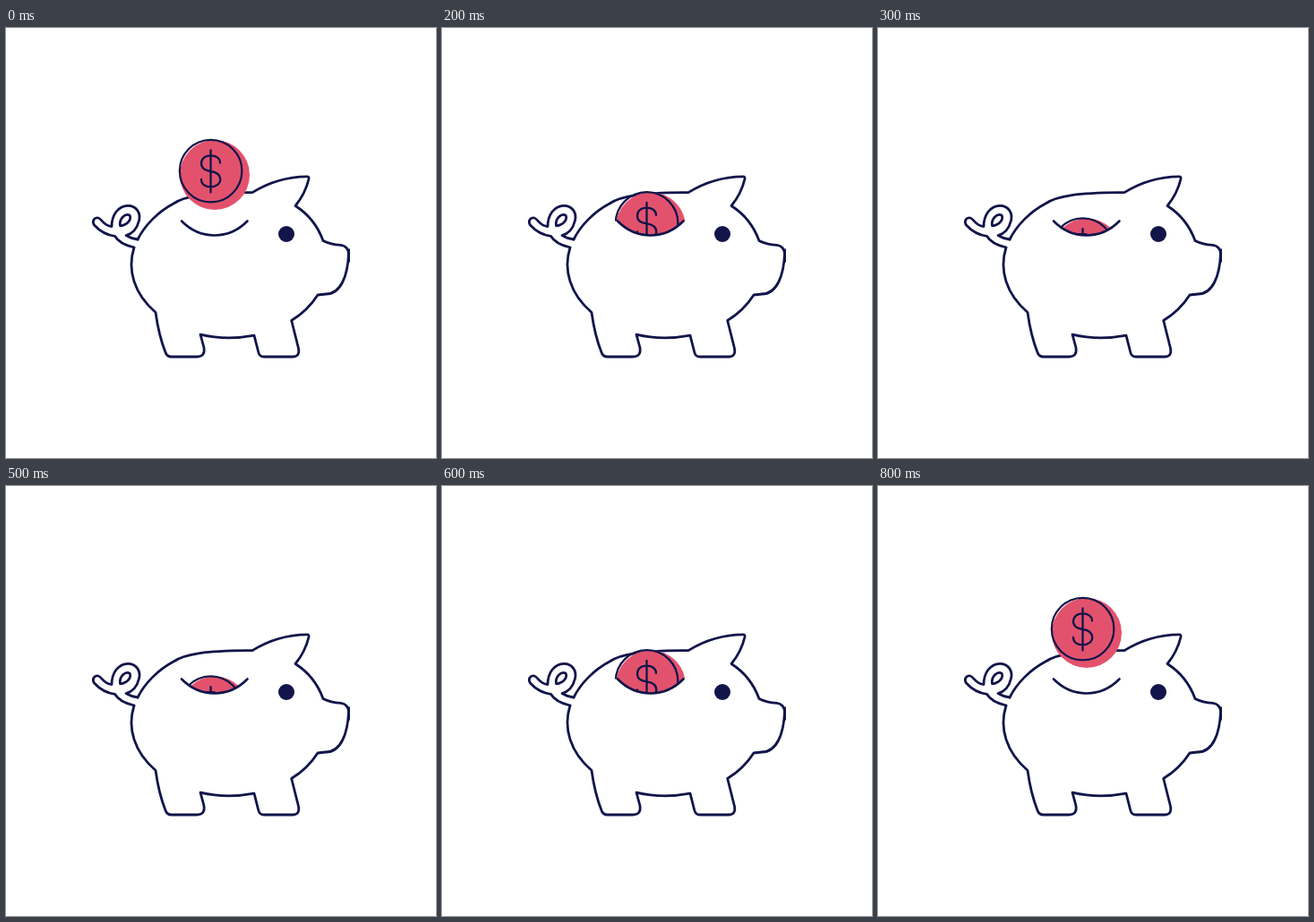
These frames come from a looping animation (480x480 px, 3.8 s). An HTML page with a canvas:

```html
<!DOCTYPE html>
<html lang="en">
<head>
<meta charset="utf-8">
<title>Piggy bank</title>
<style>
html, body { margin: 0; width: 100%; height: 100%; overflow: hidden; background: #fff; }
canvas { display: block; width: 480px; height: 480px; }
</style>
</head>
<body>
<canvas id="stage"></canvas>
<script>
const NAVY = '#11154a', CORAL = '#e3526d';
const LOOP = 3800, STEP = 100, PEAK = 4, DROP = 29.2;

const canvas = document.getElementById('stage');
const ctx = canvas.getContext('2d');
const ratio = window.devicePixelRatio || 1;
canvas.width = canvas.height = 480 * ratio;

const SLOT_CURVE = 'C217 236.8 248.5 236.8 269.5 215.5';
const slot = new Path2D('M196 215.5' + SLOT_CURVE);
const opening = new Path2D('M180 100V215.5H196' + SLOT_CURVE + 'H285V100Z');

const body = new Path2D(
  // back and ear
  'M147 236C155 220 170 205 187 196C200 187 225 184 268 183.6L275 183.6' +
  'C292 173 312 166 336 165.8Q338.6 165.8 338 168.5C335 181 330 190 323 198.5' +
  // head, snout and chin
  'C338 208 348 221 354 237.5C360 240.5 367 242 374 242.4' +
  'C379 243 382.5 247 382.5 252C381.5 276 374 297 357 297L348 298' +
  'C341 309 331 319 318.7 326.5' +
  // legs and belly
  'L326.6 358Q328 367 320 367L288 367Q283 367 281.8 362L277 343.2' +
  'C258 346.8 236 346.8 217 342.2L221 357Q222.5 367 213 367L185 367' +
  'Q179.5 367 178 362C172 347 169 332 167 317.5' +
  'C143 297 135 270 143 245'
);
const tail = new Path2D(
  'M143 245C134 243 126 240 121.5 232.3C111 231 104 226 98.5 220' +
  'C95.5 215 99 211 103 212C107 213 109 221 118 221.5' +
  'C118 209 125 198.5 136 198.3C146 198.3 150.5 207 148.5 215' +
  'C146 225 140 230 134 231.5C138 234 142 235.5 147 236' +
  'M127.5 220.8C126 213 133 206.5 138 209C140.5 213 136 220 127.5 220.8Z'
);
const dollar = new Path2D(
  'M228.5 136.5V183.5M239 150.5C239 145 234 142.3 228.5 142.3' +
  'C222 142.3 218 146 218 151C218 157.5 223 159 228.5 160' +
  'C235 161 239.3 163 239.3 169C239.3 174 234 177.4 228.5 177.4' +
  'C222 177.4 218 174 218 169'
);

function disc(x, y, r) {
  const path = new Path2D();
  path.arc(x, y, r, 0, Math.PI * 2);
  return path;
}

const eye = disc(313, 230, 9);
const coin = disc(233, 164, 39);
const rim = disc(228.6, 159.6, 34.8);

function fill(path, color) {
  ctx.fillStyle = color;
  ctx.fill(path);
}

function line(path, width) {
  ctx.lineWidth = width;
  ctx.stroke(path);
}

// The coin sinks into the slot and rises again at a constant rate.
function coinOffset(ms) {
  const step = Math.floor((ms % LOOP) / STEP);
  return Math.max(0, PEAK - Math.abs(step - PEAK)) * DROP;
}

function draw(ms) {
  ctx.setTransform(ratio, 0, 0, ratio, 0, 0);
  ctx.fillStyle = '#fff';
  ctx.fillRect(0, 0, 480, 480);
  ctx.strokeStyle = NAVY;
  ctx.lineCap = ctx.lineJoin = 'round';

  line(body, 2.8);
  line(tail, 2.8);
  fill(eye, NAVY);
  ctx.fillStyle = NAVY;
  ctx.fillRect(381.5, 246.5, 2.5, 15);

  ctx.save();
  ctx.clip(opening);
  ctx.translate(0, coinOffset(ms));
  fill(coin, CORAL);
  line(rim, 2.2);
  line(dollar, 2.3);
  ctx.restore();

  line(slot, 2.6);
}

const start = performance.now();
function tick() {
  draw(performance.now() - start);
  requestAnimationFrame(tick);
}
tick();
</script>
</body>
</html>
```
